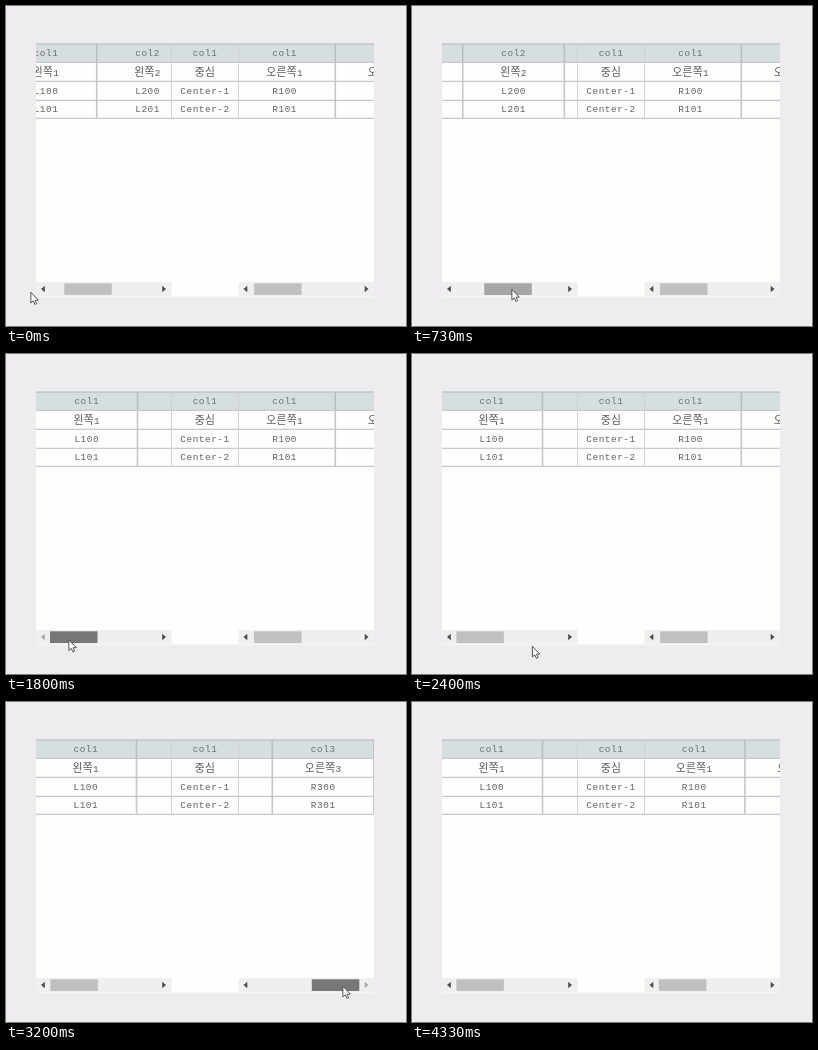
Animation of 400 by 320 pixels, one loop 4.94 s. Source, as an HTML page with a canvas:

```html
<!DOCTYPE html>
<html lang="ko">
<head>
<meta charset="utf-8">
<title>Split grid scrolling</title>
<style>
  html, body { margin: 0; width: 100%; height: 100%; overflow: hidden; background: #eeecef; }
  canvas { display: block; }
</style>
</head>
<body>
<canvas id="stage" width="400" height="320"></canvas>
<script>
const ctx = document.getElementById('stage').getContext('2d');

const LOOP = 4940, TICK = 200 / 3;
const TOP = 38, BOTTOM = 112, ROWS = [56, 75, 94];
const COL = 101.6, VIEW = 135.6, MAX_SCROLL = COL * 3 - VIEW;
const THUMB = 47.5, TRAVEL = 59.3;
const MONO = { font: '9.4px "Liberation Mono", "Courier New", monospace', spacing: 0.55 };
const HANGUL = { font: '10.8px "Noto Sans CJK KR", "Noto Sans CJK", "Noto Sans CJK JP", sans-serif', spacing: 0.3 };

// Pointer path: tick, x, y
const PATH = [
  [0, 24.5, 286], [5, 85.5, 283], [9, 99.5, 283], [13, 99.5, 283],
  [16, 100.5, 283], [22, 72, 284], [25, 63, 285], [27, 62.5, 285.5],
  [31, 63.5, 287], [32, 63.5, 287], [36, 120, 292], [40, 240, 287],
  [43, 265, 283], [44, 265, 283], [48, 336.5, 284], [49, 337, 284],
  [55, 258, 288], [56, 253.5, 288], [57, 253.5, 288], [64, 259, 23]
];

const clamp = (v, lo, hi) => Math.min(hi, Math.max(lo, v));
const between = (v, lo, hi) => v >= lo && v < hi;

function tickAt(ms) {
  const n = Math.round(ms / TICK);
  return Math.round(n * TICK / 10) * 10 > ms ? n - 1 : n;
}

function pointerAt(n) {
  const i = PATH.findIndex(k => k[0] > n);
  if (i < 0) return { x: PATH[PATH.length - 1][1], y: PATH[PATH.length - 1][2] };
  const a = PATH[i - 1], b = PATH[i], u = (n - a[0]) / (b[0] - a[0]);
  return { x: a[1] + (b[1] - a[1]) * u, y: a[2] + (b[2] - a[2]) * u };
}

function rect(x, y, w, h, color) {
  ctx.fillStyle = color;
  ctx.fillRect(x, y, w, h);
}

function polygon(points, color) {
  ctx.beginPath();
  points.forEach(([x, y]) => ctx.lineTo(x, y));
  ctx.closePath();
  ctx.fillStyle = color;
  ctx.fill();
}

function setFace(face) {
  ctx.font = face.font;
  ctx.letterSpacing = face.spacing + 'px';
}

function label(text, center, baseline, color) {
  const runs = text.match(/[가-힣]+|[^가-힣]+/g).map(part => {
    const face = /[가-힣]/.test(part) ? HANGUL : MONO;
    setFace(face);
    return { part, face, width: ctx.measureText(part).width };
  });
  let x = center - runs.reduce((sum, r) => sum + r.width, 0) / 2;
  ctx.fillStyle = color;
  for (const r of runs) {
    setFace(r.face);
    ctx.fillText(r.part, x, baseline);
    x += r.width;
  }
}

function column(center, texts) {
  label(texts[0], center, 49.5, '#6c6f71');
  label(texts[1], center, 70, '#585858');
  label(texts[2], center, 87.5, '#606060');
  label(texts[3], center, 105.5, '#606060');
}

function clipped(x, w, draw) {
  ctx.save();
  ctx.beginPath();
  ctx.rect(x, TOP - 1, w, BOTTOM - TOP + 2);
  ctx.clip();
  draw();
  ctx.restore();
}

function divider(x) {
  rect(x, TOP, 1.6, ROWS[0] - TOP, '#b9bfc1');
  rect(x, ROWS[0], 1.6, BOTTOM - ROWS[0], '#c6c6c6');
}

function scrollPane(x, name, letter, scroll) {
  clipped(x, VIEW, () => {
    for (let i = 0; i < 3; i++) {
      const left = x + i * COL - scroll, n = i + 1;
      column(left + COL / 2, ['col' + n, name + n, letter + n + '00', letter + n + '01']);
      divider(left + COL - 0.9);
    }
  });
}

function scrollbar(x, pos, pointer, active) {
  const left = x + pos;
  const over = pointer && between(pointer.x, left, left + THUMB) && between(pointer.y, 277, 289);
  rect(x - 14, 276, VIEW, 14, '#f0eff0');
  rect(left, 277.3, THUMB, 11.7, active ? '#787777' : over ? '#a5a5a5' : '#c1c0c1');
  const arrow = (tip, dir, enabled) => polygon(
    [[tip, 283], [tip + dir * 3.8, 279.8], [tip + dir * 3.8, 286.2]],
    enabled ? '#4c4c4c' : '#a8a8a8');
  arrow(x - 9, 1, pos > 0.1);
  arrow(x + 116, -1, pos < TRAVEL - 0.1);
}

function drawPointer({ x, y }) {
  ctx.save();
  ctx.translate(x, y);
  polygon([[0.4, 0.3], [0.4, 11], [2.8, 8.8], [4.4, 12.4], [6.1, 11.6], [4.6, 8.2], [7.8, 8.1]], '#fff');
  ctx.strokeStyle = '#444';
  ctx.lineWidth = 0.9;
  ctx.stroke();
  ctx.restore();
}

function draw(n) {
  const pointer = n < 65 ? pointerAt(n) : null;
  const px = pointer ? pointer.x : 0;

  // Thumbs follow the pointer while dragged
  const left = n < 5 ? 14.3 : n < 31 ? clamp(px - 71.2, 0, TRAVEL) : 0.35;
  const right = n < 44 ? 1.6 : n < 57 ? clamp(px - 263.4, 0, TRAVEL) : 0.35;
  const ratio = MAX_SCROLL / TRAVEL;

  rect(0, 0, 400, 320, '#eeecef');
  rect(30, TOP, 338, 252.5, '#fefefd');
  rect(30, TOP, 338, ROWS[0] - TOP, '#d7dedf');
  rect(30, TOP - 0.5, 338, 1, '#b3b7b9');
  [...ROWS, BOTTOM].forEach(y => rect(30, y - 0.3, 338, 1.3, '#c8c9c9'));

  scrollPane(30, '왼쪽', 'L', left * ratio);
  scrollPane(232.4, '오른쪽', 'R', right * ratio);

  rect(165, TOP, 1, BOTTOM - TOP, '#cfd0d0');
  rect(232, TOP, 1, BOTTOM - TOP, '#cfd0d0');
  column(199, ['col1', '중심', 'Center-1', 'Center-2']);

  scrollbar(44, left, pointer, between(n, 5, 9) || between(n, 13, 31));
  scrollbar(246.5, right, pointer, between(n, 44, 57));
  if (pointer) drawPointer(pointer);
}

function frame() {
  draw(tickAt(performance.now() % LOOP));
  requestAnimationFrame(frame);
}
frame();
</script>
</body>
</html>
```
